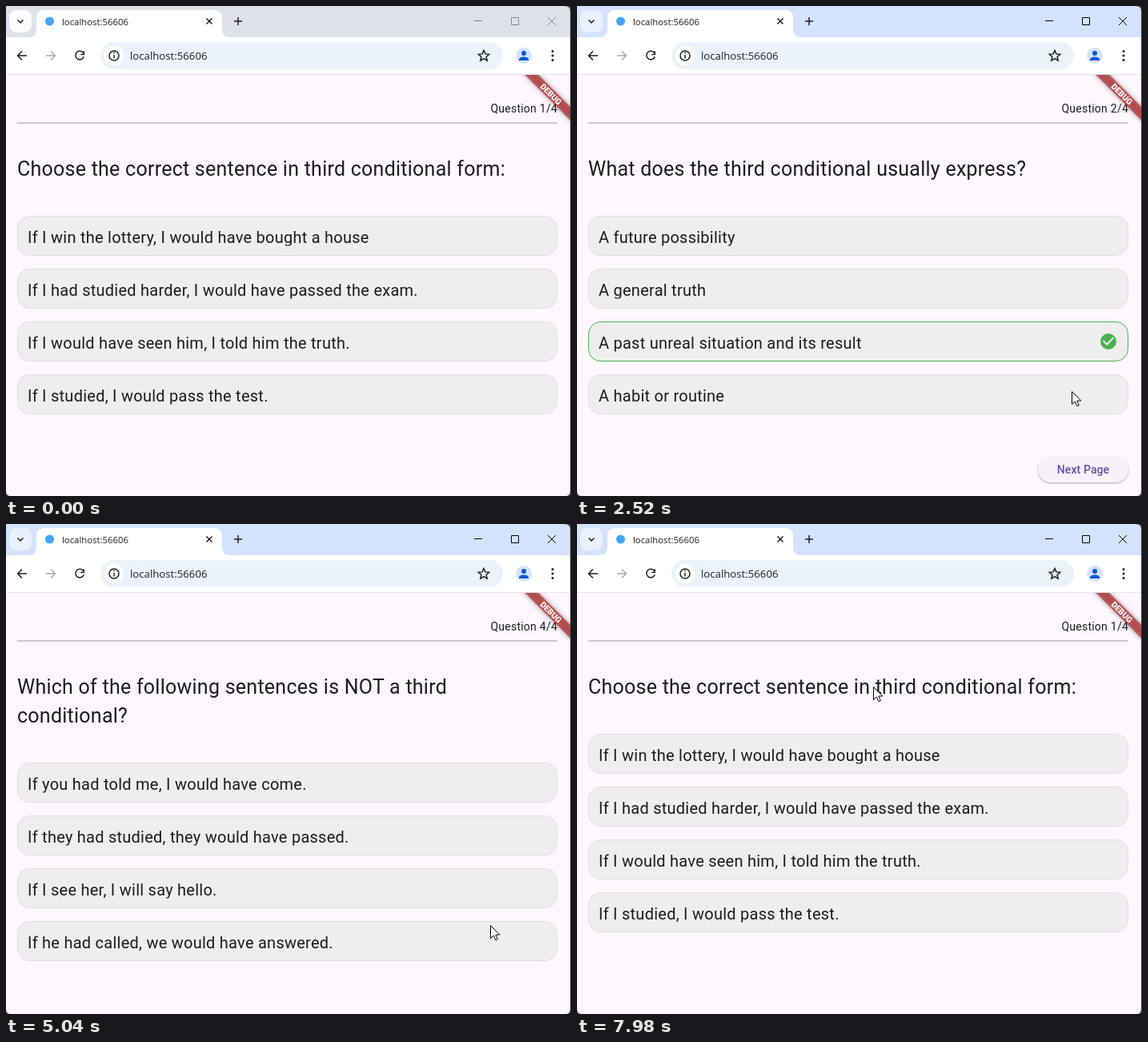
Animation, 706 px wide and 612 px high, one loop 8 s. Source, as an HTML page:

```html
<!DOCTYPE html>
<html lang="en">
<head>
<meta charset="utf-8">
<title>Quiz</title>
<style>
  html, body { margin: 0; width: 100%; height: 100%; overflow: hidden; background: #333; }
  svg { display: block; width: 706px; height: 612px; }
  text { font-family: Roboto, sans-serif; letter-spacing: .25px; fill: #1d1b20; white-space: pre; }
  .ui { font-family: "Open Sans", "Noto Sans", sans-serif; letter-spacing: 0; fill: #1f1f1f; }
  .line { fill: none; stroke: #1f1f1f; stroke-width: 1.5; }
  .button text { font-size: 14px; font-weight: 500; letter-spacing: .1px; fill: #6750a4; text-anchor: middle; }
  .button rect { fill: #f7f2fa; filter: drop-shadow(0 1px 1px #0005); }
  .button.hover rect { fill: #ebe5f3; }
</style>
</head>
<body>
<svg viewBox="0 0 706 612">
  <defs>
    <clipPath id="window"><path d="M0 0H698Q705 0 705 6V606Q705 612 699 612H6Q0 612 0 606Z"/></clipPath>
    <clipPath id="viewport"><rect x="14" y="150" width="675" height="462"/></clipPath>
    <clipPath id="row"><rect x="13" y="0" width="649" height="37.5"/></clipPath>
    <clipPath id="body"><rect y="86" width="705" height="526"/></clipPath>
  </defs>
  <g clip-path="url(#window)">
    <rect id="titlebar" width="706" height="40"/>
    <rect id="search" x="4" y="5" width="28" height="28" rx="9"/>
    <path class="line" d="M14.5 17.5l3.5 3.5 3.5-3.5"/>
    <path d="M28 39q10 0 10-10V15q0-10 10-10H260q10 0 10 10V29q0 10 10 10z" fill="#fff"/>
    <circle cx="54.5" cy="19" r="5.5" fill="#42a5f5"/>
    <text class="ui" x="70" y="24" font-size="11.35">localhost:56606</text>
    <path class="line" d="M250.5 15.5l7 7m0-7l-7 7M285 19h10m-5-5v10"/>
    <path id="controls" fill="none" d="M585 18.5h10M631.5 14.5h9v9h-9zM677 14l10 10m0-10l-10 10"/>

    <rect y="39" width="706" height="47" fill="#fff"/>
    <path class="line" d="M26 62H15m5-5.5L14.5 62l5.5 5.5"/>
    <path class="line" style="stroke:#aaa" d="M50 62H61m-5-5.500l5.500 5.500-5.500 5.500"/>
    <path class="line" d="M96.500 58.500a5.300 5.300 0 1 0 .7 4.700M97.300 56.500v4h-4"/>
    <rect x="118" y="45" width="503" height="34" rx="17" fill="#ecf2fb"/>
    <circle cx="135" cy="62" r="12" fill="#fff"/>
    <circle class="line" cx="135" cy="62" r="6"/>
    <path class="line" d="M135 61v4.500m0-8v1.700"/>
    <text class="ui" x="155" y="67" font-size="13.2">localhost:56606</text>
    <path class="line" d="M597 55.500l1.900 4.400 4.800.4-3.600 3.200 1.100 4.700-4.200-2.500-4.200 2.500 1.100-4.700-3.600-3.200 4.800-.4z"/>
    <circle cx="647" cy="62" r="10" fill="#d3e3fd"/>
    <path fill="#0b57d0" d="M644 59a3 3 0 1 1 6 0 3 3 0 1 1-6 0M641 68v-1.500q1-3 6-3t6 3V68z"/>
    <path d="M683 56.500h0m0 5.500h0m0 5.500h0" stroke="#1f1f1f" stroke-width="3" stroke-linecap="round"/>
    <path d="M0 85.500h706" stroke="#e1e3e8"/>

    <rect y="86" width="706" height="526" fill="#fef7ff"/>
    <g id="quiz">
      <text id="count" x="605.400" y="133" font-size="14"></text>
      <rect x="14" y="145" width="675" height="2" fill="#cbc7ce"/>
      <g id="fader" clip-path="url(#viewport)"><g id="strip"></g></g>
    </g>
    <g id="results">
      <text x="351.500" y="143.500" font-size="24" text-anchor="middle">You got 3/4</text>
      <text x="351.500" y="265" font-size="20" text-anchor="middle" stroke="#1d1b20" stroke-width=".7">Results History:</text>
      <text x="46" y="312" font-size="16" style="letter-spacing:.5px">Attempt 1</text>
      <text x="630" y="311" font-size="11" font-weight="500" style="letter-spacing:.5px;fill:#49454f">3/4</text>
    </g>
    <g id="buttons"></g>

    <g clip-path="url(#body)">
      <g transform="translate(705 86) rotate(45)">
        <rect x="-44" y="28" width="88" height="12" fill="#b71c1c" fill-opacity=".63" style="filter:drop-shadow(0 0 3px #0009)"/>
        <text y="37.700" font-size="10.200" font-weight="900" text-anchor="middle" style="fill:#fff;letter-spacing:0">DEBUG</text>
      </g>
    </g>
  </g>
  <path id="cursor" d="M.5.500V16.500L4.300 13l2.500 5.700 2.500-1L6.800 12h5z" fill="#fff" stroke="#000"/>
</svg>
<script>
const LOOP = 8000, TICK = 70, PAGE = 675, SLIDE = 300, FADE = 430;
const RESULTS = 6150, RESTART = 7480;
const GREEN = '#4caf50', RED = '#f44336';

// picked: time of the answer; enter: time the page starts to slide in
const questions = [
  { lines: ['Choose the correct sentence in third conditional form:'],
    options: ['If I win the lottery, I would have bought a house',
      'If I had studied harder, I would have passed the exam.',
      'If I would have seen him, I told him the truth.',
      'If I studied, I would pass the test.'],
    right: 1, choice: 0, picked: 630, enter: -FADE },
  { lines: ['What does the third conditional usually express?'],
    options: ['A future possibility', 'A general truth',
      'A past unreal situation and its result', 'A habit or routine'],
    right: 2, choice: 2, picked: 2240, enter: 1322 },
  { lines: ['Choose the sentence with the correct third conditional', 'form:'],
    options: ['If she had left earlier, she will catch the train.',
      'If we had known about the traffic, we would have left sooner.',
      'If I would know, I would have helped you.',
      'If he would have tried, he could win.'],
    right: 1, choice: 1, picked: 3920, enter: 3062 },
  { lines: ['Which of the following sentences is NOT a third', 'conditional?'],
    options: ['If you had told me, I would have come.',
      'If they had studied, they would have passed.',
      'If I see her, I will say hello.',
      'If he had called, we would have answered.'],
    right: 2, choice: 2, picked: 5530, enter: 4395 }
];

// time, x, y of the pointer tip
const path = [
  [140, 589, 397], [490, 516, 272], [630, 516, 272], [1190, 640, 585], [1400, 640, 585],
  [1610, 641, 548], [2030, 602, 402], [2240, 602, 402], [2870, 637, 579], [3080, 637, 579],
  [3220, 632, 536], [3570, 603, 368], [3710, 603, 367], [3780, 602, 365], [4130, 602, 365],
  [4340, 634, 584], [4900, 634, 580], [4970, 625, 560], [5040, 605, 501], [5390, 598, 450],
  [5529, 598, 450], [5530, 608, 530], [5740, 608, 530], [5950, 620, 589], [6090, 620, 589],
  [6300, 619, 580], [6510, 619, 580], [6580, 619, 578], [7350, 356, 187], [7490, 356, 187],
  [7980, 370, 203]
];

const $ = id => document.getElementById(id);
const clamp = v => Math.max(0, Math.min(1, v));
const ease = v => v * v * (3 - 2 * v);
const show = (el, on) => el.style.display = on ? '' : 'none';

function add(parent, tag, attrs, text = '') {
  const el = document.createElementNS('http://www.w3.org/2000/svg', tag);
  for (const k in attrs) el.setAttribute(k, attrs[k]);
  el.textContent = text;
  return parent.appendChild(el);
}

const DISC = 'M12 2a10 10 0 1 0 0 20 10 10 0 1 0 0-20z';
const CHECK = DISC + 'M10 17l-5-5 1.400-1.400 3.600 3.600 7.600-7.600L19 8z';
const CROSS = DISC + 'M17 15.600L15.600 17 12 13.400 8.400 17 7 15.600 10.600 12 7 8.400 8.400 7 12 10.600 15.600 7 17 8.400 13.400 12z';

function makeCard(page, text, y, mark) {
  const g = add(page, 'g', { transform: `translate(0 ${y})` });
  const box = add(g, 'rect', { x: .5, y: .5, width: 674, height: 49, rx: 15, fill: '#eee' });
  add(g, 'text', { x: 13, y: 34, 'font-size': 20, 'clip-path': 'url(#row)' }, text);
  const icon = add(g, 'path', {
    d: mark === RED ? CROSS : CHECK, fill: mark || 'none', 'fill-rule': 'evenodd', transform: 'translate(638 13)'
  });
  return answered => {
    box.setAttribute('stroke', answered && mark || '#dedede');
    show(icon, answered);
  };
}

function makeButton(label, x, y, width) {
  const g = add($('buttons'), 'g', { class: 'button' });
  add(g, 'rect', { x, y, width, height: 32, rx: 16 });
  add(g, 'text', { x: x + width / 2, y: y + 21 }, label);
  return (on, [px, py]) => {
    show(g, on);
    g.classList.toggle('hover', px > x && px < x + width && py > y && py < y + 32);
  };
}

questions.forEach((q, i) => {
  const page = add($('strip'), 'g', { transform: `translate(${i * PAGE} 0)` });
  q.lines.forEach((line, n) => add(page, 'text', { x: 0, y: 212 + 36 * n, 'font-size': 25 }, line));
  const top = 226 + 36 * q.lines.length;
  q.cards = q.options.map((text, n) =>
    makeCard(page, text, top + 66 * n, n === q.right ? GREEN : n === q.choice ? RED : ''));
});

const next = makeButton('Next Page', 576, 563, 113);
const finish = makeButton('Show Results', 551, 563, 138);
const again = makeButton('Try Again', 297, 172, 109);

function pointer(t) {
  const i = path.findIndex(p => p[0] > t);
  if (i < 0) return path[path.length - 1].slice(1);
  if (!i) return [-50, -50];
  const [t0, x0, y0] = path[i - 1], [t1, x1, y1] = path[i];
  const k = (t - t0) / (t1 - t0);
  return [x0 + (x1 - x0) * k, y0 + (y1 - y0) * k];
}

function draw(t) {
  const active = t >= 630;
  $('titlebar').setAttribute('fill', active ? '#d3e3fd' : '#dee1e8');
  $('search').setAttribute('fill', active ? '#e9f1fe' : '#fbfcfd');
  $('controls').setAttribute('stroke', active ? '#000' : '#85878b');

  const done = t >= RESULTS && t < RESTART, restarted = t >= RESTART;
  const at = restarted ? 0 : questions.filter(q => t >= q.enter).length - 1;
  const since = t - (restarted ? RESTART : questions[at].enter);
  const pos = at ? at - 1 + ease(clamp(since / SLIDE)) : 0;
  const tip = pointer(t);

  show($('quiz'), !done);
  show($('results'), done);
  $('count').textContent = `Question ${at + 1}/4`;
  $('fader').setAttribute('opacity', clamp(since / FADE));
  $('strip').setAttribute('transform', `translate(${14 - PAGE * pos} 0)`);

  const answered = q => t >= q.picked && t < RESULTS;
  for (const q of questions) q.cards.forEach(mark => mark(answered(q)));
  const ready = answered(questions[at]);
  next(ready && at < 3, tip);
  finish(ready && at === 3, tip);
  again(done, tip);
  $('cursor').setAttribute('transform', `translate(${tip.map(Math.round)})`);
}

function frame() {
  const t = performance.now() % LOOP;
  draw(Math.floor(t / TICK) * TICK);
  requestAnimationFrame(frame);
}
frame();
</script>
</body>
</html>
```
